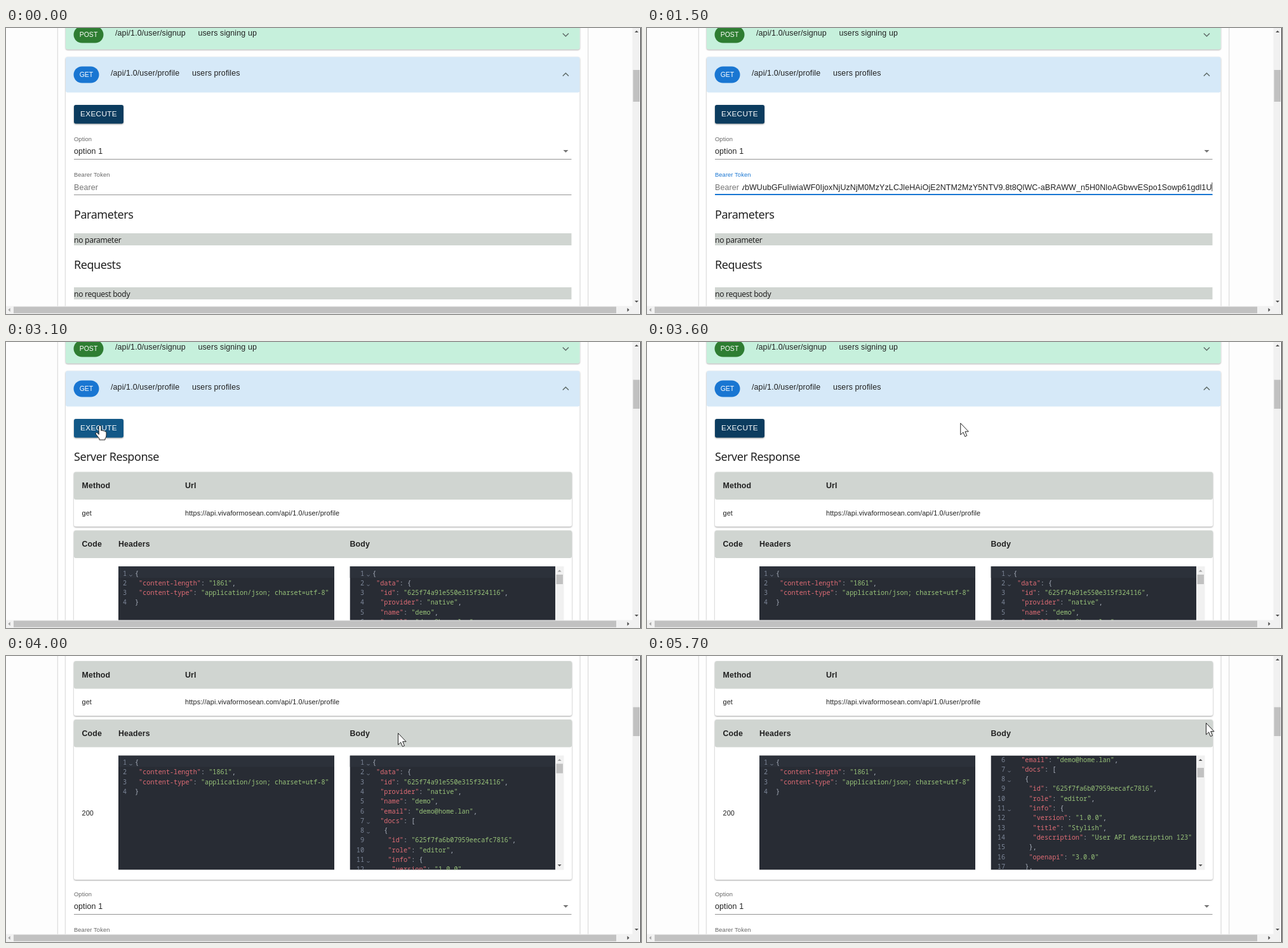
Animation of 1000 by 450 pixels, one loop 6300 ms. Source, as an HTML page:

```html
<!DOCTYPE html>
<html lang="en">
<head>
<meta charset="utf-8">
<title>API explorer</title>
<style>
html, body { margin: 0; width: 100%; height: 100%; overflow: hidden; background: #fdfdfd; }
#stage { display: block; width: 100%; height: 100%; }
text { font: 12.45px "Liberation Sans", Arial, sans-serif; letter-spacing: .0094em; fill: #212121; white-space: pre; }
.small { font-size: 9.35px; fill: #666; }
.muted { fill: #757575; }
.chip { font-size: 10.5px; fill: #fff; letter-spacing: 0; }
.button { font-size: 11.8px; fill: #fff; letter-spacing: .0286em; }
.head { font-weight: bold; font-size: 12.4px; }
.cell { font-size: 10.9px; letter-spacing: .0107em; }
.title, .note { font-family: "Noto Sans", sans-serif; letter-spacing: -.025em; }
.title { font-size: 18px; font-weight: 500; }
.note { font-size: 12.1px; }
.code { font: 10.2px "Noto Sans Mono", monospace; letter-spacing: 0; fill: #abb2bf; }
.line { fill: #7d8799; text-anchor: end; }
.raised { filter: drop-shadow(0 1px 1.2px rgba(0, 0, 0, .38)); }
.stroke { fill: none; stroke: #5f6b68; stroke-width: 1.5; }
</style>
</head>
<body>
<svg id="stage" viewBox="0 0 1000 450" preserveAspectRatio="none"></svg>
<script>
const LOOP = 6300, STEP = 100;
const FORM_SHIFT = 396.5, LINE_HEIGHT = 15.3, CHAR_WIDTH = 6.12;
const GRAY = '#d0d5d1', BLUE = '#1976d2';
const TOKEN = 'eyJhbGciOiJIUzI1NiIsInR5cCI6IkpXVCJ9.eyJwcm92aWRlciI6Im5hdGl2ZSIsIm5hbWUiOiJkZW1vIiwiZW1haWwiOiJkZW1vQGhvbWUubGFuIiwiaWF0IjoxNjUzNjM0MzYzLCJleHAiOjE2NTM2MzY5NTV9.8t8QlWC-aBRAWW_n5H0NloAGbwvESpo1Sowp61gdl1U';

const headers = { 'content-length': '1861', 'content-type': 'application/json; charset=utf-8' };
const body = {
  data: {
    id: '625f74a91e550e315f324116', provider: 'native', name: 'demo', email: 'demo@home.lan',
    docs: [{
      id: '625f7fa6b07959eecafc7816', role: 'editor',
      info: { version: '1.0.0', title: 'Stylish', description: 'User API description 123' },
      openapi: '3.0.0'
    }, {}]
  }
};

const rect = (x, y, w, h, fill, extra = '') =>
  `<rect x="${x}" y="${y}" width="${w}" height="${h}" fill="${fill}" ${extra}/>`;
const text = (x, y, content, cls = '', extra = '') =>
  `<text x="${x}" y="${y}" class="${cls}" ${extra}>${content}</text>`;
const path = (d, extra) => `<path d="${d}" ${extra}/>`;
const group = (id, content) => `<g id="${id}">${content}</g>`;

function arrow(x, y, angle, fill = '#505050', extra = '') {
  return path('M-3 1.6L0 -1.6L3 1.6Z', `fill="${fill}" transform="translate(${x} ${y}) rotate(${angle})" ${extra}`);
}

function accordion(y, height, headHeight, color, chip, chipWidth, chipColor, url, summary, chevron) {
  const mid = y + 28, urlX = 125 + chipWidth;
  return rect(94, y, 809.5, height, '#fff', 'rx="3" class="raised"') +
    rect(94, y, 809.5, headHeight, color, 'rx="3"') +
    rect(106.5, mid - 13, chipWidth, 26, chipColor, 'rx="13"') +
    text(106.5 + chipWidth / 2, mid + 3.6, chip, 'chip', 'text-anchor="middle"') +
    text(urlX, mid + 1, url) + text(urlX + (chip === 'POST' ? 130.5 : 128), mid + 1, summary) +
    path(`M876.8 ${mid + 2 * chevron}l4.6 ${-4.5 * chevron}l4.6 ${4.5 * chevron}`, 'class="stroke"');
}

function editor(x, width, gutter, data, id) {
  const lines = JSON.stringify(data, null, 1).split('\n').slice(0, 17);
  const rows = lines.map((line, i) => {
    const y = 14.5 + i * LINE_HEIGHT;
    const source = line.trim();
    const indent = line.length - source.length;
    const colored = source.replace(/("[^"]*")(:?)/g, (_, string, colon) =>
      `<tspan fill="${colon ? '#e06c75' : '#98c379'}">${string}</tspan>${colon}`);
    const fold = '{['.includes(source.at(-1))
      ? path(`M${gutter + 4.5} ${y - 1}l2 2l2 -2`, 'fill="none" stroke="#7d8799"') : '';
    return text(gutter, y, i + 1, 'code line') + fold +
      text(gutter + 13 + indent * CHAR_WIDTH, y, colored, 'code');
  }).join('');
  return `<svg x="${x}" y="353" width="${width}" height="180">` +
    rect(0, 0, width, 180, '#282c34') +
    group(id, rect(0, 0, width, 18, '#2c313a') + rows) + '</svg>';
}

function tableBox(y, height, cells) {
  return rect(107, y, 784, height, '#fff', 'rx="3" class="raised"') +
    rect(107, y, 784, 43.5, GRAY, 'rx="3"') +
    cells.map(([x, label]) => text(x, y + 25.8, label, 'head')).join('');
}

const button =
  rect(107, 121, 78, 29.5, '#0c3c5f', 'id="button" rx="3" class="raised"') +
  '<svg x="107" y="121" width="78" height="29.5"><circle id="ripple" cx="40.5" cy="14" fill="#fff"/></svg>' +
  text(117, 139.3, 'EXECUTE', 'button');

const response =
  text(107, 187.3, 'Server Response', 'title') +
  tableBox(204.5, 86, [[119.5, 'Method'], [282, 'Url']]) +
  text(119.5, 272.5, 'get', 'cell') +
  text(282, 272.5, 'https://api.vivaformosean.com/api/1.0/user/profile', 'cell') +
  tableBox(296.5, 252, [[119.5, 'Code'], [177, 'Headers'], [541.5, 'Body']]) +
  text(119.5, 447, '200', 'cell') +
  editor(177, 340, 13, headers, 'headerCode') +
  editor(541.5, 323.5, 22.5, body, 'bodyCode') +
  rect(865, 353, 13.5, 180, '#f1f1f1') +
  arrow(871.7, 360, 0, '#a3a3a3', 'id="codeUp"') + arrow(871.7, 526, 180) +
  rect(866.5, 366, 10.5, 15, '#c1c1c1', 'id="codeThumb"');

const form =
  text(107, 178, 'Option', 'small') + text(107, 197.6, 'option 1') +
  rect(107, 206, 783.5, 1, '#949494') + path('M877.5 192h8l-4 4z', 'fill="#757575"') +
  text(107, 234, 'Bearer Token', 'small', 'id="tokenLabel"') +
  text(107, 254.6, 'Bearer', 'muted') +
  rect(107, 262, 783.5, 1, '#949494', 'id="underline"') +
  rect(107, 261, 783.5, 2, BLUE, 'id="focusLine"') +
  '<svg x="150" y="236" width="740.5" height="25">' +
  text(1.5, 18.6, TOKEN, '', 'id="token"') + rect(0, 7, 1, 14, '#111', 'id="caret"') + '</svg>' +
  text(107, 300, 'Parameters', 'title') + rect(107, 323, 783.5, 19, GRAY) + text(107, 337.6, 'no parameter', 'note') +
  text(107, 379, 'Requests', 'title') + rect(107, 408, 783.5, 19, GRAY) + text(107, 422.6, 'no request body', 'note');

const scrollbars =
  rect(986.5, 0, 13.5, 450, '#f1f1f1') + rect(0, 437.5, 1000, 12.5, '#f1f1f1') +
  rect(987.5, 66, 10.5, 50, '#c1c1c1', 'id="thumb"') + rect(12, 438.5, 949, 10.3, '#c1c1c1') +
  arrow(993, 5.5, 0) + arrow(993, 430.5, 180) +
  arrow(5, 443.5, -90, '#a3a3a3') + arrow(980, 443.5, 90) +
  rect(999, 0, 1, 450, '#333');

const outline = 'fill="#fff" stroke="#222" stroke-width="1" stroke-linejoin="round"';
const pointers = group('pointer',
  path('M0 0V18.2L4.2 14.3L7 21L10 19.7L7.2 13.2H12.6Z', `id="arrow" ${outline}`) +
  path('M-1.8 1.5Q0 -1 1.8 1.5V8.5Q3.5 7 5 9Q6.8 7.8 7.8 9.8Q9.8 9 10 11.5V16Q10 19 8 21V23H-1V21L-6.5 14Q-7.5 11.5 -5.5 11.5Q-4 11.5 -1.8 14.5Z', `id="hand" ${outline}`) +
  path('M-3 -7Q0 -7 0 -5Q0 -7 3 -7M0 -5V5M-3 7Q0 7 0 5Q0 7 3 7', 'id="beam" fill="none" stroke="#222"'));

const stage = document.getElementById('stage');
stage.innerHTML = rect(0, 0, 1000, 450, '#fdfdfd') +
  group('page',
    rect(82, -20, 834, 1400, '#fefefe', 'class="raised"') +
    accordion(-17.5, 51, 51, '#c6f0dc', 'POST', 47, '#2e7d32', '/api/1.0/user/signup', 'users signing up', -1) +
    accordion(45.5, 1200, 56, '#d6e9f8', 'GET', 40, BLUE, '/api/1.0/user/profile', 'users profiles', 1) +
    button + group('response', response) + group('form', form)) +
  scrollbars + pointers;

const parts = {};
stage.querySelectorAll('[id]').forEach(el => parts[el.id] = el);
const set = (id, attrs) => { for (const name in attrs) parts[id].setAttribute(name, attrs[name]); };
const show = (id, visible) => set(id, { visibility: visible ? 'visible' : 'hidden' });
const clamp = v => Math.max(0, Math.min(1, v));

// Linear interpolation through [time, ...values] keys.
function track(keys, t) {
  const next = keys.findIndex(key => key[0] > t);
  if (next < 0) return keys[keys.length - 1].slice(1);
  if (next === 0) return keys[0].slice(1);
  const a = keys[next - 1], b = keys[next], p = (t - a[0]) / (b[0] - a[0]);
  return a.slice(1).map((v, i) => v + (b[i + 1] - v) * p);
}

const pagePosition = [[3600, 0], [3700, 52], [3800, 118], [3900, 170], [4000, 196.5]];
const codePosition = [[4700, 0], [4800, 22], [4900, 46], [5000, 65], [5100, 76], [5200, 81]];
const pointerPosition = [
  [200, 650, 425], [500, 575, 330], [800, 499, 253], [1900, 499, 253], [2200, 310, 185], [2400, 148, 131],
  [3300, 148, 131], [3500, 370, 134], [3700, 617.5, 121.5], [4000, 617.5, 121.5],
  [4500, 700, 250], [5400, 780, 250], [5600, 868, 125], [5700, 880.5, 105.5]
];

function draw(t) {
  const [scroll] = track(pagePosition, t);
  const [codeScroll] = track(codePosition, t);
  const [x, y] = track(pointerPosition, t);
  const focused = t >= 900 && t < 2500;
  const pasted = t >= 1400;
  const responded = t >= 2900;

  const inside = (left, top, right, bottom) => x > left && x < right && y + scroll > top && y + scroll < bottom;
  const overButton = inside(107, 121, 185, 151);
  const overField = !responded && inside(150, 238, 890, 264);
  const overCode = responded && inside(541, 353, 865, 533);
  const present = t >= 200 && !(t >= 1400 && t < 1900);

  set('page', { transform: `translate(0 ${-scroll})` });
  set('form', { transform: `translate(0 ${responded ? FORM_SHIFT : 0})` });
  show('response', responded);
  set('thumb', responded ? { y: 59.5 + scroll * .107, height: 45.5 } : { y: 66, height: 50 });
  set('bodyCode', { transform: `translate(0 ${-codeScroll})` });
  set('codeThumb', { y: 366 + codeScroll * .08 });
  set('codeUp', { fill: codeScroll ? '#505050' : '#a3a3a3' });

  const hoverField = overField && present;
  set('underline', { height: hoverField ? 2 : 1, y: hoverField ? 261 : 262, fill: hoverField ? '#333' : '#949494' });
  const spread = focused ? 783.5 * Math.sqrt(clamp((t - 800) / 300)) : 0;
  set('focusLine', { x: 498.75 - spread / 2, width: spread });
  parts.tokenLabel.style.fill = focused ? BLUE : '#666';
  show('token', pasted);
  set('token', focused ? { x: 739.5, 'text-anchor': 'end' } : { x: 1.5, 'text-anchor': 'start' });
  show('caret', focused);
  set('caret', { x: pasted ? 739.5 : 1 });

  set('button', { fill: overButton && present ? '#125887' : '#0c3c5f' });
  set('ripple', {
    r: t >= 2500 ? 12 + (t - 2500) * .16 : 0,
    opacity: t >= 2500 ? .28 * clamp((3000 - t) / 400) : 0
  });

  set('pointer', { transform: `translate(${x} ${y})` });
  show('hand', present && overButton);
  show('beam', present && overField);
  show('arrow', present && !overButton && !overField && !overCode);
}

const start = performance.now();
function tick() {
  const elapsed = (performance.now() - start) % LOOP;
  draw(Math.floor(elapsed / STEP) * STEP);
  requestAnimationFrame(tick);
}
tick();
</script>
</body>
</html>
```
